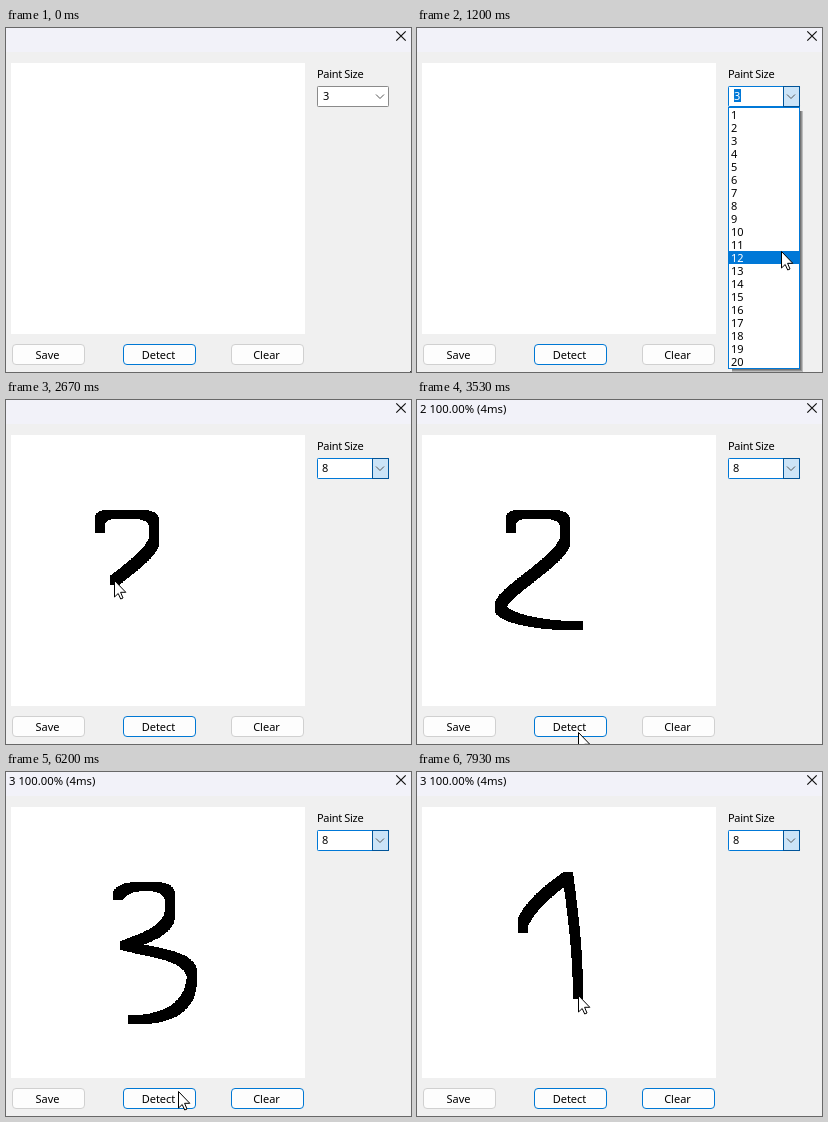
These frames come from a looping animation (405 by 344 pixels, 8 s). An HTML page:

```html
<!DOCTYPE html>
<html lang="en">
<head>
<meta charset="utf-8">
<title>Digit detector</title>
<style>
  html, body { margin: 0; width: 100%; height: 100%; overflow: hidden; background: #f0f0f0; }
  svg { display: block; width: 100vw; height: 100vh; }
  text { font: 11px "Noto Sans", "Open Sans", sans-serif; fill: #000; white-space: pre; }
  .mid { text-anchor: middle; }
</style>
</head>
<body>
<svg viewBox="0 0 405 344">
  <rect width="405" height="344" fill="#f0f0f0"/>
  <rect width="405" height="24" fill="#f2f2f9"/>
  <text id="title" x="3" y="13" style="font-size:11.3px"></text>
  <path d="M390.3 3.3l9.4 9.4m0-9.4l-9.4 9.4" stroke="#111" stroke-width="1.2"/>
  <rect x="5" y="35" width="294" height="271" fill="#fff"/>
  <path id="ink" shape-rendering="crispEdges"/>
  <text x="311" y="50" style="letter-spacing:-.32px">Paint Size</text>

  <rect id="combo" x="311.5" y="58.5" width="71" height="20" rx=".8" fill="#fff"/>
  <rect id="arrow" x="366.5" y="58.5" width="16" height="20" fill="#cce4f7" stroke="#005499"/>
  <path d="M370 66.5l4 4 4-4" fill="none" stroke="#555"/>
  <rect id="mark" x="317" y="61" width="7" height="13" fill="#0078d7"/>
  <text id="size" y="72"></text>

  <g id="buttons"></g>

  <clipPath id="reveal"><rect id="window" x="305" y="79" width="90" height="0"/></clipPath>
  <g id="list" clip-path="url(#reveal)">
    <g id="shadow"></g>
    <rect x="311.5" y="79.5" width="71" height="261" fill="#fff" stroke="#0078d7"/>
    <rect id="hot" x="312" width="70" height="13" fill="#0078d7"/>
    <g id="rows"></g>
  </g>

  <path id="cursor" d="M.5.5V17L4.2 13.5 6.7 19 9 18 6.6 12.3H11.8Z" fill="#fff" stroke="#000"/>
</svg>
<script>
const LOOP = 8000, TICK = 1000 / 15, TICKS = 120;
const $ = id => document.getElementById(id);

function make(tag, attrs, label = '') {
  const el = document.createElementNS('http://www.w3.org/2000/svg', tag);
  for (const name in attrs) el.setAttribute(name, attrs[name]);
  el.textContent = label;
  return el;
}
const add = (id, ...spec) => $(id).appendChild(make(...spec));
function set(el, attrs) {
  for (const name in attrs) el.setAttribute(name, attrs[name]);
}

// Looks of a push button
const IDLE = { fill: '#fdfdfd', stroke: '#d0d0d0' };
const FOCUS = { fill: '#fdfdfd', stroke: '#0078d4' };
const HOVER = { fill: '#e0eef9', stroke: '#0078d4' };
const PRESS = { fill: '#cce4f7', stroke: '#005499' };

function button(x, label, look) {
  const box = add('buttons', 'rect', { x: x + .5, y: 316.5, width: 72, height: 20, rx: 3.5, ...look });
  add('buttons', 'text', { x: x + 35.5, y: 331, class: 'mid' }, label);
  return box;
}
button(6, 'Save', IDLE);
button(117, 'Detect', FOCUS);
const clearBox = button(225, 'Clear', IDLE);

const rows = Array.from({ length: 20 }, (_, i) =>
  add('rows', 'text', { x: 314, y: 91 + 13 * i }, i + 1));
for (let i = 1; i < 4; i++)
  add('shadow', 'rect', { x: 315, y: 83, width: 68 + i, height: 258 + i, opacity: .22 });

// All times below are in ticks
const open = 10, pick = 28, results = { 2: 53, 3: 90 };
const clears = [{ over: 59, press: 64, leave: 72 }, { over: 98, press: 103, leave: 112 }];

// The pointer follows chained path pieces; those with ink leave a line
const legs = [];
let at = '404 343';
function leg(start, end, d, ink, pace) {
  const path = make('path', { d: `M${at}${d}` }), length = path.getTotalLength();
  const tip = path.getPointAtLength(length);
  at = `${tip.x} ${tip.y}`;
  legs.push({ start, end, path, length, ink, pace });
}
const move = (start, end, d) => leg(start, end, d, false);
const draw = (start, end, d, pace = 1) => leg(start, end, d, true, pace);

move(0, open, 'Q110 200 380 69');
move(13, 18, 'L364 223');
move(19, 23, 'V182');
move(pick, 34, 'L94 128');
draw(34, 45, 'V121Q94 114 106 114H132Q148 114 148 124V139C148 158 83 192 83 207C84 216 120 226 161 225');
move(45, 50, 'V332');
move(results[2], 62, 'L258 328');
move(clears[0].press, 71, 'L112 123');
draw(72, 84, 'C118 113 135 114 145 114Q164 114 164 126V139C164 158 140 165 119 173' +
  'C150 181 186 183 186 204C186 232 165 248 126 247');
move(84, 89, 'L172 319');
move(93, 100, 'L262 327');
move(104, 112, 'L106 156');
draw(112, 119, 'V150Q114 130 151 104Q161 175 161 223', 1.7);

function travelled({ start, end, length, ink, pace }, k) {
  const s = Math.min(1, (k - start) / (end - start));
  return length * (ink ? s ** pace : s * s * (3 - 2 * s));
}

function pointOn(leg, dist) {
  const p = leg.path.getPointAtLength(dist);
  return [Math.round(p.x), Math.round(p.y)];
}

// Square brush stamped along the line drawn since the last wipe
function inkAt(k) {
  const wiped = Math.max(0, ...clears.map(c => c.press).filter(t => t <= k));
  const line = legs.find(l => l.ink && l.start <= k && l.start >= wiped);
  if (!line) return '';
  const stamps = new Set();
  for (let dist = 0, end = travelled(line, k); dist <= end; dist++) {
    const [x, y] = pointOn(line, dist);
    stamps.add(`M${x - 5} ${y - 4}h10v9h-10z`);
  }
  return [...stamps].join('');
}

function clearLook(k) {
  const visit = clears.filter(c => c.over <= k).pop();
  if (!visit) return IDLE;
  return k < visit.press ? HOVER : k < visit.leave ? PRESS : FOCUS;
}

function render(k) {
  const leg = legs.filter(l => l.start <= k).pop();
  const [x, y] = pointOn(leg, travelled(leg, k));
  set($('cursor'), { transform: `translate(${x} ${y})` });
  set($('ink'), { d: inkAt(k) });

  const digit = Object.keys(results).filter(n => results[n] <= k).pop();
  $('title').textContent = digit ? `${digit} 100.00% (4ms)` : '';

  const active = k >= open - 1, selected = k >= open && k < 34;
  set($('combo'), { stroke: active ? '#0078d7' : '#8a8a8a' });
  set($('arrow'), { opacity: +active });
  set($('mark'), { opacity: +selected });
  set($('size'), { x: k < 34 ? 317 : 316 });
  $('size').textContent = k < pick ? 3 : 8;
  $('size').style.fill = selected ? '#fff' : '#000';

  set($('list'), { visibility: k > open && k < pick ? 'visible' : 'hidden' });
  set($('window'), { height: 265 * Math.min(1, Math.max(0, (k - open) / 3)) });
  const row = y < 80 ? 3 : Math.min(20, Math.floor((y - 80) / 13) + 1);
  set($('hot'), { y: 67 + 13 * row });
  rows.forEach((el, i) => { el.style.fill = i + 1 === row ? '#fff' : '#000'; });

  set(clearBox, clearLook(k));
}

let shown = -1;
function frame() {
  const k = Math.floor((performance.now() % LOOP + 4) / TICK) % TICKS;
  if (k !== shown) render(shown = k);
  requestAnimationFrame(frame);
}
frame();
</script>
</body>
</html>
```
